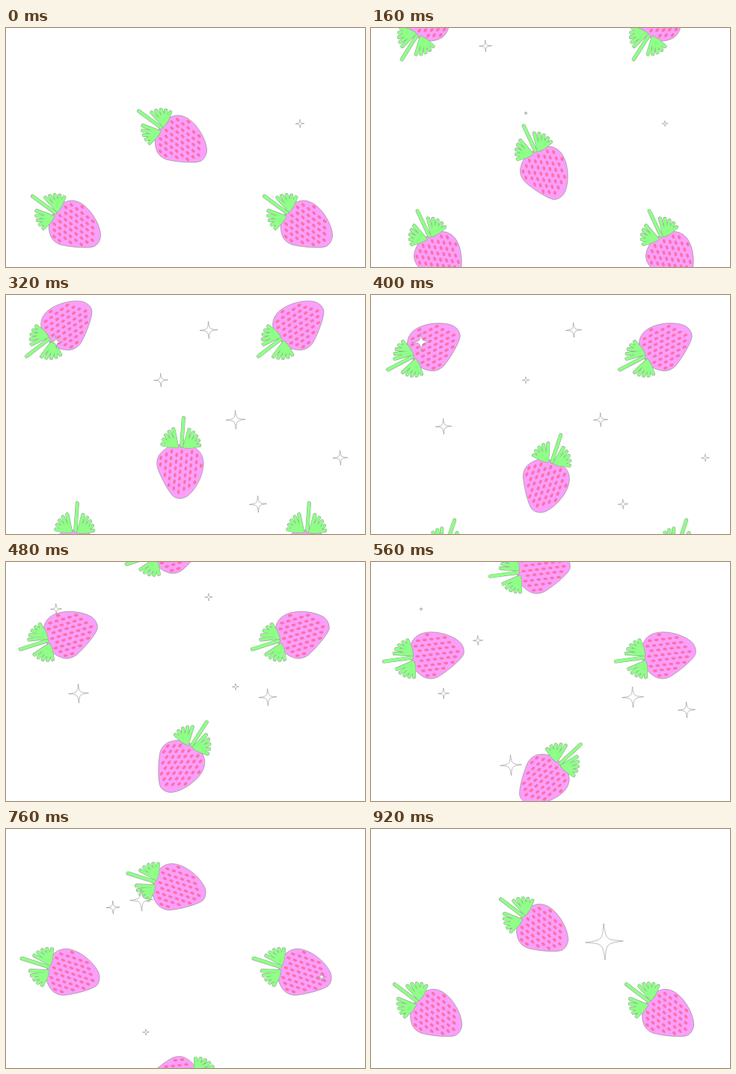
An HTML page with a canvas that plays this animation: 480x320 px, repeating every 960 ms.

```html
<!DOCTYPE html>
<html lang="en">
<head>
<meta charset="utf-8">
<title>Falling strawberries</title>
<style>
  html, body { margin: 0; width: 100%; height: 100%; overflow: hidden; background: #fff; }
  canvas { display: block; }
</style>
</head>
<body>
<canvas id="stage" width="480" height="320"></canvas>
<script>
const ctx = document.getElementById('stage').getContext('2d');
const LOOP = 960, STEP = 40, DEG = Math.PI / 180;
const PINK = '#fa9ffb', SEED = '#ff6fa6', GREEN = '#8fff88', LINE = '#8c8c8c';

// The berry lies on its side: stem to the left, tip to the right.
const body = new Path2D('M-35 2C-37-18-27-31-10-31C6-31 25-21 33-11C37-6 38 2 35 7' +
  'C30 14 10 25 0 29C-8 33-18 32-24 26C-31 20-35 12-35 2Z');

// One long stem and a fan of leaves on either side of it.
const leaves = new Path2D('M-71-2.5L-34-1');
for (const side of [-1, 1]) {
  for (let angle = 25; angle <= 85; angle += 15) {
    const y = side * 25 * Math.sin(angle * DEG);
    leaves.moveTo(-33, y * 0.5);
    leaves.lineTo(-33 - 25 * Math.cos(angle * DEG), y);
  }
}

const seeds = new Path2D();
for (let row = -4; row <= 4; row++) {
  for (let col = -4; col <= 4; col++) {
    const x = col * 9 + (row & 1 ? 4.5 : 0) + 1, y = row * 6.8 + col * 0.5;
    if (x < -27 || !ctx.isPointInPath(body, x / 0.9, y / 0.9)) continue;
    const seed = new Path2D();
    seed.ellipse(x, y, 2.9, 1.8, 0.15, 0, 7);
    seeds.addPath(seed);
  }
}

const sparkle = new Path2D('M0-1C.1-.1 .1-.1 1 0C.1 .1 .1 .1 0 1C-.1 .1-.1 .1-1 0C-.1-.1-.1-.1 0-1Z');

// One berry enters from above while the one before it leaves below.
const entering = t => [231 - 2.8e-5 * (760 - t) ** 2, 0.354 * t - 189, t / 8 - 80];
const leaving = t => [235 - 2.1e-5 * t * t, 153 + 0.27 * t - 3.6e-5 * t * t, 34 + 0.18 * t];
const columns = [[0, 0], [-142, 114], [168, 114]];

// Stars: x, y, time of peak. Later stars grow larger.
const RISE = 120, FALL = 220;
const stars = [
  [393, 128, 40], [153, 24, 120], [207, 114, 260], [447, 218, 270], [337, 280, 290],
  [307, 167, 330], [271, 47, 340], [67, 63, 370], [97, 176, 440], [350, 181, 520],
  [187, 272, 590], [422, 198, 610], [143, 105, 640], [181, 95, 700], [312, 151, 920]
];

function drawBerry(x, y, degrees) {
  ctx.save();
  ctx.translate(x, y);
  ctx.rotate(degrees * DEG);
  ctx.fillStyle = PINK;
  ctx.fill(body);
  ctx.strokeStyle = LINE;
  ctx.lineWidth = 0.6;
  ctx.stroke(body);
  ctx.fillStyle = SEED;
  ctx.fill(seeds);
  ctx.lineCap = 'round';
  for (const [color, width] of [[LINE, 5], [GREEN, 4.2]]) {
    ctx.strokeStyle = color;
    ctx.lineWidth = width;
    ctx.stroke(leaves);
  }
  ctx.restore();
}

function drawStar([x, y, peak], t) {
  const growth = t < peak ? 1 - (peak - t) / RISE : 1 - (t - peak) / FALL;
  const r = (8 + peak / 53) * growth;
  if (r < 2) return;
  ctx.save();
  ctx.translate(x, y);
  ctx.rotate(-0.04);
  ctx.scale(r, r * 0.96);
  ctx.fillStyle = '#fff';
  ctx.fill(sparkle);
  ctx.strokeStyle = LINE;
  ctx.lineWidth = 0.6 / r;
  ctx.stroke(sparkle);
  ctx.restore();
}

function draw(now) {
  const t = Math.floor(now % LOOP / STEP) * STEP;
  ctx.fillStyle = '#fff';
  ctx.fillRect(0, 0, 480, 320);
  for (const path of [entering, leaving]) {
    const [x, y, degrees] = path(t);
    for (const [dx, dy] of columns) drawBerry(x + dx, y + dy, degrees);
  }
  for (const star of stars) drawStar(star, t);
}

const start = performance.now();
function tick() {
  draw(performance.now() - start);
  requestAnimationFrame(tick);
}
tick();
</script>
</body>
</html>
```
